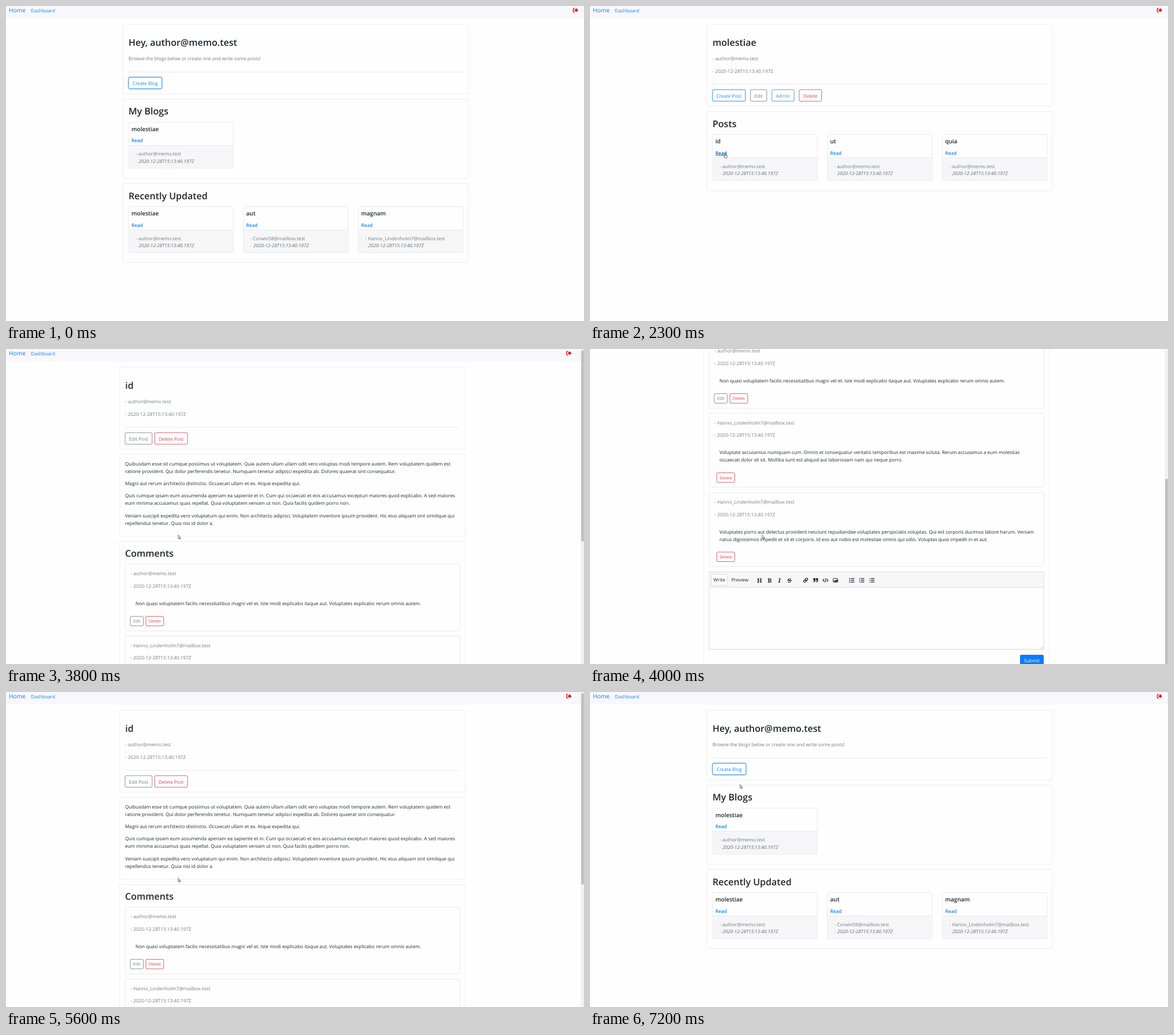
These frames come from a looping animation (1000 px wide and 546 px high, 7300 ms). An HTML page:

```html
<!DOCTYPE html>
<html lang="en">
<head>
<meta charset="utf-8">
<title>Blog app walkthrough</title>
<style>
  html, body { margin: 0; width: 100%; height: 100%; overflow: hidden; background: #fefefe; }
  svg { display: block; width: 100vw; height: 100vh; }
  text {
    font: 400 8.16px "Open Sans", "Noto Sans", sans-serif;
    text-rendering: geometricPrecision; fill: #212529; white-space: pre;
  }
  .h { font-size: 16px; font-weight: 600; }
  .t { font-size: 10px; font-weight: 600; }
  .brand { font-size: 10.2px; fill: #0d7ff5; }
  .link { fill: #0d7ff5; }
  .read { fill: #0d7ff5; font-weight: 600; }
  .hot { fill: #0056b3; text-decoration: underline; }
  .mute { fill: #737880; }
  .pale { fill: #a0a4a9; }
  .date { fill: #666b72; font-style: italic; }
  .btn { text-anchor: middle; }
  .small { font-size: 7.1px; }
  .ico { font: 700 10.5px "Noto Serif", "Liberation Serif", serif; text-anchor: middle; }
  .slant { font-style: italic; }
</style>
</head>
<body>
<svg id="stage" viewBox="0 0 1000 546" preserveAspectRatio="none"></svg>
<script>
const LOOP = 7300, STEP = 100;
const BLUE = '#2a8cf7', GRAY = '#8d939a', RED = '#e0606c', TEAL = '#4fa3d0';
const ME = 'author@memo.test', P2 = 'Corwin58@mailbox.test', P3 = 'Hanno_Lindenholm7@mailbox.test';
const STAMP = '2020-12-28T15:13:40.197Z';

const text = (x, y, s, cls = '', extra = '') =>
  `<text x="${x}" y="${y}" class="${cls}" ${extra}>${s}</text>`;
const rect = (x, y, w, h, fill = 'none', stroke = 'none', rx = 0) =>
  `<rect x="${x}" y="${y}" width="${w}" height="${h}" rx="${rx}" fill="${fill}" stroke="${stroke}"/>`;
const path = (d, stroke = '#24292e', fill = 'none', w = 1) =>
  `<path d="${d}" stroke="${stroke}" fill="${fill}" stroke-width="${w}"/>`;
const group = (id, s, tf = '') => `<g id="${id}" transform="${tf}">${s}</g>`;
const card = (y, bottom) => rect(202.5, y, 597.5, bottom - y, '#fefefe', '#ededf0', 2);
const rule = y => path(`M212 ${y}H790`, '#e9e9ec');

function button(x, y, w, label, line, ink, small) {
  const h = small ? 16.5 : 20;
  return rect(x, y, w, h, '#fff', line, 2) +
    text(x + w / 2, y + (small ? 10.9 : 13.5), label, 'btn' + (small ? ' small' : ''), `style="fill:${ink}"`);
}
const blueBtn = (x, y, w, s) => button(x, y, w, s, BLUE, '#1c82f0');
const grayBtn = (x, y, w, s, small) => button(x, y, w, s, GRAY, '#757b83', small);
const redBtn = (x, y, w, s, small) => button(x, y, w, s, RED, '#d9404f', small);

// iconX: centre of the sign-out button
function nav(iconX) {
  const x = iconX - 5;
  return rect(0, -10, 1000, 32, '#f8f8fc') +
    text(5, 11.2, 'Home', 'brand') + text(43, 10.6, 'Dashboard', 'link') +
    rect(iconX - 8.5, -2, 17, 18.5, '#fdfdfd', 'none', 2) +
    path(`M${x + 3.6} 3.9H${x + 2}Q${x + .9} 3.9 ${x + .9} 5V9.4Q${x + .9} 10.5 ${x + 2} 10.5H${x + 3.6}`, '#e8101c', 'none', 1.4) +
    path(`M${x + 3} 5.8H${x + 5.4}V3.3L${x + 9.6} 7.2L${x + 5.4} 11.1V8.6H${x + 3}Z`, 'none', '#e8101c');
}

function tile(x, y, title, who, id = '') {
  return rect(x, y, 181.5, 80, '#fefefe', '#ebebee', 2) +
    rect(x + .5, y + 40.5, 180.5, 39, '#f6f6f8') + path(`M${x} ${y + 40.5}h181.5`, '#e8e8eb') +
    text(x + 5, y + 15.5, title, 't') + text(x + 5, y + 35, 'Read', 'read', id && `id="${id}"`) +
    text(x + 12, y + 58, '- ' + who, 'mute') +
    text(x + 12, y + 70.6, '-', 'pale') + text(x + 17.2, y + 70.6, STAMP, 'date');
}
const COLS = [212, 410.5, 609.5];

const dash = nav(985.5) + card(31.5, 152.5) +
  text(212, 69, 'Hey, ' + ME, 'h') +
  text(212, 94.3, 'Browse the blogs below or create one and write some posts!', 'mute') + rule(114.5) +
  rect(211, 122.6, 60, 21.8, 'none', '#cfe4fc', 3) + blueBtn(212, 123.5, 57.8, 'Create Blog') +
  card(161.5, 298.5) + text(212, 188.3, 'My Blogs', 'h') + tile(212, 201.2, 'molestiae', ME, 'readBlog') +
  card(307.5, 444.5) + text(212, 334.7, 'Recently Updated', 'h') +
  [['molestiae', ME], ['aut', P2], ['magnam', P3]].map((c, i) => tile(COLS[i], 347.6, ...c)).join('');

const header = title => card(31.5, 173.5) + text(212, 69, title, 'h') +
  text(212, 94.3, '- ' + ME, 'mute') + text(212, 115.6, '- ' + STAMP, 'mute') + rule(135.8);

const blog = nav(985.5) + header('molestiae') +
  blueBtn(211.8, 145, 57, 'Create Post') + grayBtn(277.6, 145, 28.2, 'Edit') +
  button(314.6, 145, 38.6, 'Admin', TEAL, '#3595c6') + redBtn(362, 145, 38.7, 'Delete') +
  card(182.5, 320.3) + text(212, 209.7, 'Posts', 'h') +
  ['id', 'ut', 'quia'].map((s, i) => tile(COLS[i], 222.6, s, ME, i ? '' : 'readPost')).join('');

const BODY = [
  [201.6, 'Quibusdam esse sit cumque possimus ut voluptatem. Quia autem ullam ullam odit vero voluptas modi tempore autem. Rem voluptatem quidem est'],
  [214.5, 'ratione provident. Qui dolor perferendis tenetur. Numquam tenetur adipisci expedita ab. Dolores quaerat sint consequatur.'],
  [236, 'Magni aut rerum architecto distinctio. Occaecati ullam et ex. Atque expedita qui.'],
  [257.4, 'Quis cumque ipsam eum assumenda aperiam ea sapiente et in. Cum qui occaecati et eos accusamus excepturi maiores quod explicabo. A sed maiores'],
  [270.3, 'eum minima accusamus quas repellat. Quia voluptatem veniam ut non. Quia facilis quidem porro non.'],
  [291.7, 'Veniam suscipit expedita vero voluptatum qui enim. Non architecto adipisci. Voluptatem inventore ipsum provident. Hic eius aliquam sint similique qui'],
  [304.6, 'repellendus tenetur. Quia nisi id dolor a.']
];

function comment(y, h, who, lines, own) {
  const by = y + h - 25.3;
  return rect(206, y, 579, h, '#fefefe', '#ebebee', 2) +
    text(215.5, y + 19.2, '- ' + who, 'mute') + text(215.5, y + 40.7, '- ' + STAMP, 'mute') +
    lines.map((s, i) => text(224, y + 70.6 + i * 12.9, s)).join('') +
    (own ? grayBtn(215, by, 22.6, 'Edit', 1) + redBtn(242, by, 30.8, 'Delete', 1)
         : redBtn(219.3, by + .3, 31.2, 'Delete', 1));
}

function listIcon(x, y, kind) {
  let s = '';
  for (let i = -1; i < 2; i++) {
    const ly = y + i * 3;
    s += path(`M${x - 1.5} ${ly}h6`, '#24292e', 'none', 1.3);
    s += kind === 1 ? path(`M${x - 3.4} ${ly - 1.2}v2.2`, '#24292e', 'none', .9)
       : kind === 2 ? path(`M${x - 4.6} ${ly}l.9 .9l1.5 -1.8`, '#24292e', 'none', .8)
       : rect(x - 4.4, ly - .8, 1.7, 1.6, '#24292e');
  }
  return s;
}

function editor() {
  const y = 786.9;
  const link = [-1.9, 1.9].map(d =>
    `<rect x="${370.7 + d}" y="${y - 1.7}" width="4.8" height="3.4" rx="1.7" fill="none" stroke="#24292e" stroke-width="1.3" transform="rotate(-45 373 ${y})"/>`).join('');
  const quote = [386.2, 390.8].map(x =>
    path(`M${x} ${y - 3.6}h3.7v3.8q0 3.2 -3.2 3.4v-1.5q1.4 -.2 1.4 -2h-1.9Z`, 'none', '#24292e')).join('');
  return rect(206, 772.5, 579, 134, '#fefefe', '#d9d9dd') +
    rect(206.5, 773, 578, 26, '#f7f7f9') + path('M206 799H785', '#dedee2') +
    rect(209.5, 776.5, 28.5, 19.5, '#fbfbfc', '#d8d8dc', 1) +
    text(223.7, 789.3, 'Write', 'btn') + text(259.4, 789.3, 'Preview', 'btn') +
    text(293.2, 790.8, 'H', 'ico') + text(310.8, 790.8, 'B', 'ico') + text(327.5, 790.8, 'I', 'ico slant') +
    text(345.2, 790.8, 'S', 'ico') + path(`M340.8 ${y}h8.8`) + link + quote +
    path(`M405.2 ${y - 2.4}l-2.2 2.4l2.2 2.4M409.6 ${y - 2.4}l2.2 2.4l-2.2 2.4M408.3 ${y - 3.6}l-1.8 7.2`, '#24292e', 'none', 1.2) +
    rect(420.8, y - 3.1, 7.8, 6.4, 'none', '#24292e', .8) +
    path(`M421.6 ${y + 2.6}v-1.2l1.8 -1.6l1.2 1l2 -2.4l1.6 2v2.2Z`, 'none', '#24292e') +
    [452.8, 470, 487.6].map((x, i) => listIcon(x, y, i)).join('') +
    path('M779.5 905.5l4.5 -4.5M782 905.5l2 -2', '#aaa', 'none', .7) +
    rect(744, 916, 41, 20.5, '#0a7cfb', 'none', 2) +
    text(764.5, 929.4, 'Submit', 'btn', 'style="fill:#fff"');
}

const post = nav(974) +
  group('top', header('id') + card(182.5, 324.5) + card(333.5, 946), 'translate(-5.8 0)') +
  grayBtn(206, 145, 46.8, 'Edit Post') + redBtn(257.2, 145, 56.8, 'Delete Post') +
  BODY.map(([y, s]) => text(206, y, s)).join('') +
  text(206, 360.4, 'Comments', 'h') +
  comment(373.2, 115.5, ME, ['Non quasi voluptatem facilis necessitatibus magni vel et. Iste modi explicabo itaque aut. Voluptates explicabo rerum omnis autem.'], true) +
  comment(497.6, 128, P3, [
    'Voluptate accusamus numquam cum. Omnis et consequatur veritatis temporibus est maxime soluta. Rerum accusamus a eum molestias',
    'occaecati dolor sit sit. Mollitia sunt est aliquid aut laboriosam nam qui neque porro.']) +
  comment(635, 128, P3, [
    'Voluptates porro aut delectus provident nesciunt repudiandae voluptates perspiciatis voluptas. Qui est corporis ducimus labore harum. Veniam',
    'natus dignissimos impedit et sit et corporis. Id eos aut nobis est molestiae omnis qui odio. Voluptas quos impedit in et aut.']) +
  editor();

const arrow = path('M0 0V6.2L1.5 4.9L2.5 7.1L3.5 6.6L2.5 4.5H4.3Z', '#333', '#fff', .7);
const hand = path('M-.7 .6Q0 -.5 .7 .6V3.1L3 3.6Q3.7 3.9 3.5 4.8L3 7.6H-.7L-2.4 5Q-2 4.1 -.7 5Z', '#333', '#fff', .7);

document.getElementById('stage').innerHTML =
  rect(0, 0, 1000, 546, '#fefefe') +
  group('dash', dash) + group('blog', blog) +
  group('post', group('sheet', post) + rect(994.5, 0, 6, 546, '#f2f2f3') +
    '<rect id="thumb" x="995" width="6" height="331" fill="#c2c2c4"/>') +
  group('cursor', group('arrow', arrow) + group('hand', hand));

const PAGES = [[0, 'dash'], [1000, 'blog'], [2700, 'post'], [6000, 'blog'], [6900, 'dash']];
const SCROLL = [[3800, 0], [3900, 210], [4000, 386], [4300, 386], [4500, 280], [4700, 100], [4900, 0]];
const MOUSE = [
  [100, 480, 300], [500, 268, 238], [700, 233, 234], [1900, 233, 234], [2200, 234, 255.5],
  [3100, 234, 255.5], [3500, 298, 322.6], [5600, 298, 322.6], [5900, 52, -12],
  [6700, 52, -12], [6800, 52, 4], [7200, 259.6, 160.4]
];

function at(table, t) {
  const n = table.findIndex(k => k[0] > t);
  if (n === 0) return table[0].slice(1);
  if (n < 0) return table[table.length - 1].slice(1);
  const a = table[n - 1], b = table[n];
  const u = (t - a[0]) / (b[0] - a[0]);
  return a.slice(1).map((v, i) => v + (b[i + 1] - v) * u);
}

const $ = id => document.getElementById(id);
const show = (id, on) => { $(id).style.display = on ? '' : 'none'; };

function draw(t) {
  const page = PAGES.filter(p => p[0] <= t).pop()[1];
  for (const id of ['dash', 'blog', 'post']) show(id, id === page);

  const [scroll] = at(SCROLL, t);
  $('sheet').setAttribute('transform', `translate(0 ${-scroll})`);
  $('thumb').setAttribute('y', 2.5 + scroll * .577);

  const overBlog = t >= 700 && t < 1000, overPost = t >= 2200 && t < 2700;
  $('readBlog').classList.toggle('hot', overBlog);
  $('readPost').classList.toggle('hot', overPost);
  show('hand', overBlog || overPost);
  show('arrow', !(overBlog || overPost));
  show('cursor', t >= 100);
  $('cursor').setAttribute('transform', `translate(${at(MOUSE, t)})`);
}

const start = performance.now();
function tick() {
  const t = (performance.now() - start) % LOOP;
  draw(Math.floor(t / STEP) * STEP);
  requestAnimationFrame(tick);
}
tick();
</script>
</body>
</html>
```
